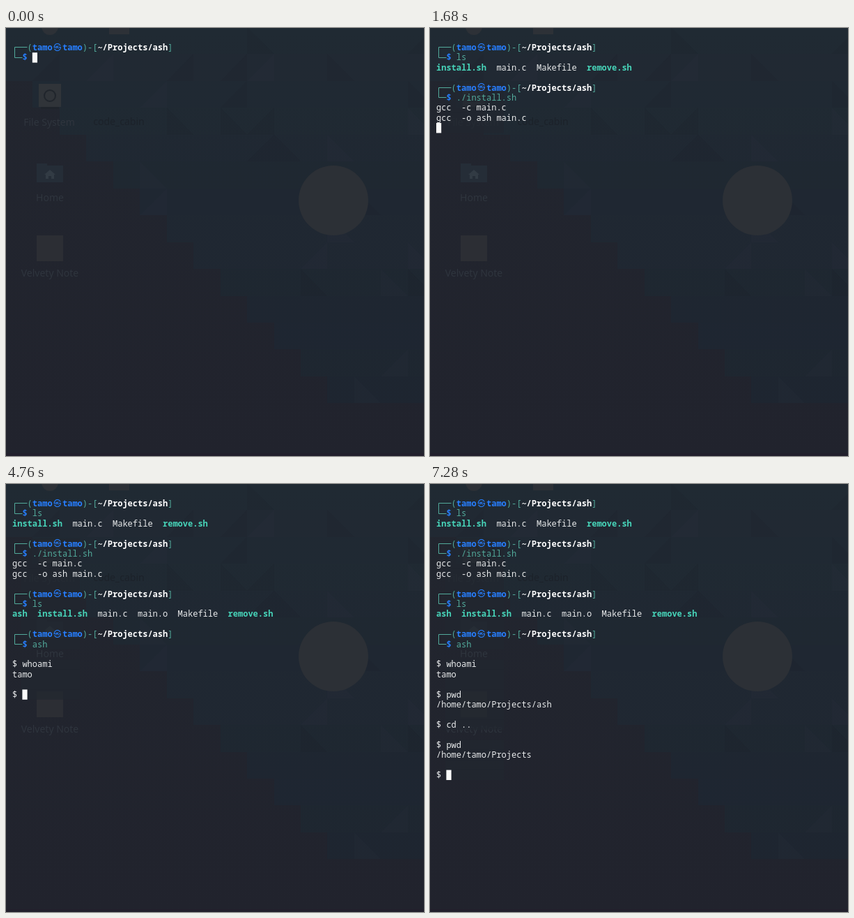
Animation, 600 px wide and 613 px high, one loop 8 s. Source, as an HTML page with a canvas:

```html
<!DOCTYPE html>
<html lang="en">
<head>
<meta charset="utf-8">
<title>Terminal session</title>
<style>
html, body { margin: 0; width: 100%; height: 100%; overflow: hidden; background: #22252e; }
canvas { display: block; }
</style>
</head>
<body>
<canvas id="stage" width="600" height="613"></canvas>
<script>
const W = 600, H = 613, LOOP = 8000;
const CELL = 7.2, PITCH = 14.4, LEFT = 9, TOP = 20.8;
const MONO = '12px "Noto Sans Mono", "DejaVu Sans Mono", monospace';
const SIGN = 'bold 11px "Noto Sans CJK KR", "Noto Sans CJK JP", sans-serif';
const ctx = document.getElementById('stage').getContext('2d');

// Style letters: ^t teal, ^b blue, ^p path, ^g executable, ^w plain, ^u underlined, ^s suggestion
const COLORS = { t: '#52aa9b', b: '#277fff', p: '#ffffff', g: '#47d4b9', w: '#e9ebec', u: '#e9ebec', s: '#828890' };
const BOLD = 'bpg';

const HEAD = '   ^t(^btamo㉿tamo^t)-[^p~/Projects/ash^t]';
const ASK = '  ^b$^w ';
const FILES = '^ginstall.sh^w  main.c  Makefile  ^gremove.sh';
const MORE = '^gash^w  ^ginstall.sh^w  main.c  main.o  Makefile  ^gremove.sh';

// [time, first row, lines...]; the cursor rests after the last line, before any suggestion
const EVENTS = [
  [0, 0, HEAD, ASK],
  [560, 1, ASK + '^ul^ss'],
  [630, 1, ASK + '^tls'],
  [700, 1, ASK + '^tls', FILES, ''],
  [770, 4, HEAD, ASK],
  [910, 5, ASK + '^u.^s/remove.sh'],
  [980, 5, ASK + '^u./^sremove.sh'],
  [1190, 5, ASK + '^u./i^snstall.sh'],
  [1260, 5, ASK + '^u./in^sstall.sh'],
  [1330, 5, ASK + '^u./ins^stall.sh'],
  [1470, 5, ASK + '^t./install.sh'],
  [1540, 6, 'gcc  -c main.c', ''],
  [1610, 7, 'gcc  -o ash main.c', ''],
  [1750, 9, HEAD, ASK],
  [2310, 10, ASK + '^ul^ss'],
  [2380, 10, ASK + '^tls'],
  [2450, 11, MORE, '', HEAD, ASK],
  [2730, 14, ASK + '^ua^ssh'],
  [2800, 14, ASK + '^uas^sh'],
  [2870, 14, ASK + '^tash'],
  [3080, 16, '$ '],
  [3990, 16, '$ who'],
  [4130, 16, '$ whoam'],
  [4620, 16, '$ whoami'],
  [4760, 17, 'tamo', '', '$ '],
  [5530, 19, '$ p'],
  [5600, 19, '$ pw'],
  [5670, 19, '$ pwd'],
  [5810, 20, '/home/tamo/Projects/ash', ''],
  [5880, 22, '$ '],
  [6510, 22, '$ c'],
  [6580, 22, '$ cd '],
  [6650, 22, '$ cd .'],
  [6790, 22, '$ cd ..'],
  [6860, 24, '$ '],
  [7000, 24, '$ pw'],
  [7070, 24, '$ pwd'],
  [7210, 25, '/home/tamo/Projects', ''],
  [7280, 27, '$ ']
];

const rowTop = row => TOP + row * PITCH;

function box(c, color, x, y, w, h) {
  c.fillStyle = color;
  c.fillRect(x, y, w, h);
}

function disc(c, color, x, y, r) {
  c.fillStyle = color;
  c.beginPath();
  c.arc(x, y, r, 0, 7);
  c.fill();
}

function label(c, text, x, y, color) {
  c.font = '14px "Noto Sans", "Open Sans", sans-serif';
  c.textAlign = 'center';
  c.fillStyle = color;
  c.fillText(text, x, y);
}

function paintTiles(c) {
  const size = 38.45;
  let seed = 11;
  const random = () => (seed = seed * 16807 % 2147483647) / 2147483647;
  for (let r = 0; r < 14; r++) {
    for (let q = r < 2 ? 0 : r - 1; q < 16; q++) {
      const x = Math.round(q * size), y = Math.round(r * size - 1);
      const w = Math.round((q + 1) * size) - x, h = Math.round((r + 1) * size - 1) - y;
      const k = r / 14;
      box(c, `rgba(${30 - 6 * k},${50 - 6 * k},${60 - 2 * k},${.34 - .06 * k})`, x, y, w, h);
      if (random() < .5) continue;
      c.fillStyle = random() < .5 ? 'rgba(20,24,34,.1)' : 'rgba(70,90,100,.04)';
      const flip = random() < .5;
      c.beginPath();
      c.moveTo(x, flip ? y : y + h);
      c.lineTo(x + w, flip ? y + h : y);
      c.lineTo(random() < .5 ? x : x + w, y + h);
      c.fill();
    }
  }
}

function paintIcons(c) {
  const grey = '#2d3137', text = '#2f353e';
  disc(c, grey, 63, -2, 12);
  box(c, grey, 148, 0, 29, 9);

  box(c, '#303439', 47, 80, 32, 33);
  box(c, '#1f242b', 50, 113, 26, 3);
  c.strokeStyle = '#20252c';
  c.lineWidth = 2;
  c.beginPath();
  c.arc(63, 97, 8, 0, 7);
  c.stroke();
  label(c, 'File System', 62, 140, text);
  label(c, 'code_cabin', 162, 139, '#1c222a');

  box(c, '#252d37', 44, 197, 38, 24);
  box(c, '#252d37', 44, 194, 15, 4);
  c.fillStyle = '#323b44';
  c.fill(new Path2D('M63 203l8 7h-2v6h-4v-4h-4v4h-4v-6h-2z'));
  label(c, 'Home', 63, 248, text);

  box(c, '#2c2e34', 44, 297, 38, 37);
  label(c, 'Velvety Note', 63, 356, text);
}

function makeBackdrop() {
  const canvas = document.createElement('canvas');
  canvas.width = W;
  canvas.height = H;
  const c = canvas.getContext('2d');
  const shade = c.createLinearGradient(0, 0, 0, H);
  shade.addColorStop(0, '#22262f');
  shade.addColorStop(1, '#21232d');
  box(c, shade, 0, 0, W, H);
  paintTiles(c);
  disc(c, '#2c3036', 470, 247, 50);
  paintIcons(c);
  box(c, '#221f2c', 0, 609, W, 4);
  return canvas;
}

function parse(line) {
  let col = 0, cursor = null;
  const spans = ('^w' + line).split('^').slice(1).map(part => {
    const span = { style: part[0], text: part.slice(1), col };
    if (span.style === 's') cursor = col;
    col += span.text.length + (span.text.includes('㉿') ? 1 : 0);
    return span;
  });
  return { spans, cursor: cursor ?? col };
}

function drawText(text, col, row, color, bold) {
  ctx.font = (bold ? 'bold ' : '') + MONO;
  ctx.textAlign = 'left';
  ctx.fillStyle = color;
  const y = rowTop(row) + 11.2;
  const [before, after] = text.split('㉿');
  ctx.fillText(before, LEFT + col * CELL, y);
  if (after === undefined) return;
  const next = col + before.length;
  ctx.fillText(after, LEFT + (next + 2) * CELL, y);
  ctx.font = SIGN;
  ctx.textAlign = 'center';
  ctx.fillText('㉿', LEFT + (next + 1) * CELL, y - .5);
}

function drawCorner(row) {
  const middle = r => Math.floor(rowTop(r) + 7) + .5;
  const x = 12.5;
  ctx.strokeStyle = COLORS.t;
  ctx.lineWidth = 1;
  ctx.beginPath();
  ctx.moveTo(30.5, middle(row));
  ctx.lineTo(x, middle(row));
  ctx.lineTo(x, middle(row + 1));
  ctx.lineTo(23.5, middle(row + 1));
  ctx.stroke();
}

function drawLine(line, row) {
  // printed rows hide most of the desktop icons behind them
  if (row > 3) box(ctx, 'rgba(33,39,48,.7)', 22, rowTop(row), 84, PITCH);
  if (line === HEAD) drawCorner(row);
  for (const { style, text, col } of parse(line).spans) {
    drawText(text, col, row, COLORS[style], BOLD.includes(style));
    if (style === 'u') box(ctx, COLORS.u, LEFT + col * CELL, Math.round(rowTop(row) + 12.6), text.length * CELL, 1);
  }
}

function drawCursor(line, row) {
  const { spans, cursor } = parse(line);
  const hint = spans.find(s => s.style === 's');
  box(ctx, hint ? '#9c9995' : '#fbfbfb', LEFT + cursor * CELL, rowTop(row), CELL, PITCH);
  if (hint) drawText(hint.text[0], cursor, row, '#30343b');
}

const backdrop = makeBackdrop();

function frame() {
  const t = performance.now() % LOOP;
  const screen = [];
  let last = 0;
  for (const [time, first, ...lines] of EVENTS) {
    if (time > t) break;
    lines.forEach((line, i) => screen[last = first + i] = line);
  }
  ctx.drawImage(backdrop, 0, 0);
  // corners reach into the next row, so rows are drawn from the bottom up
  for (let row = screen.length - 1; row >= 0; row--) {
    if (screen[row] !== undefined) drawLine(screen[row], row);
  }
  drawCursor(screen[last], last);
  requestAnimationFrame(frame);
}
frame();
</script>
</body>
</html>
```
